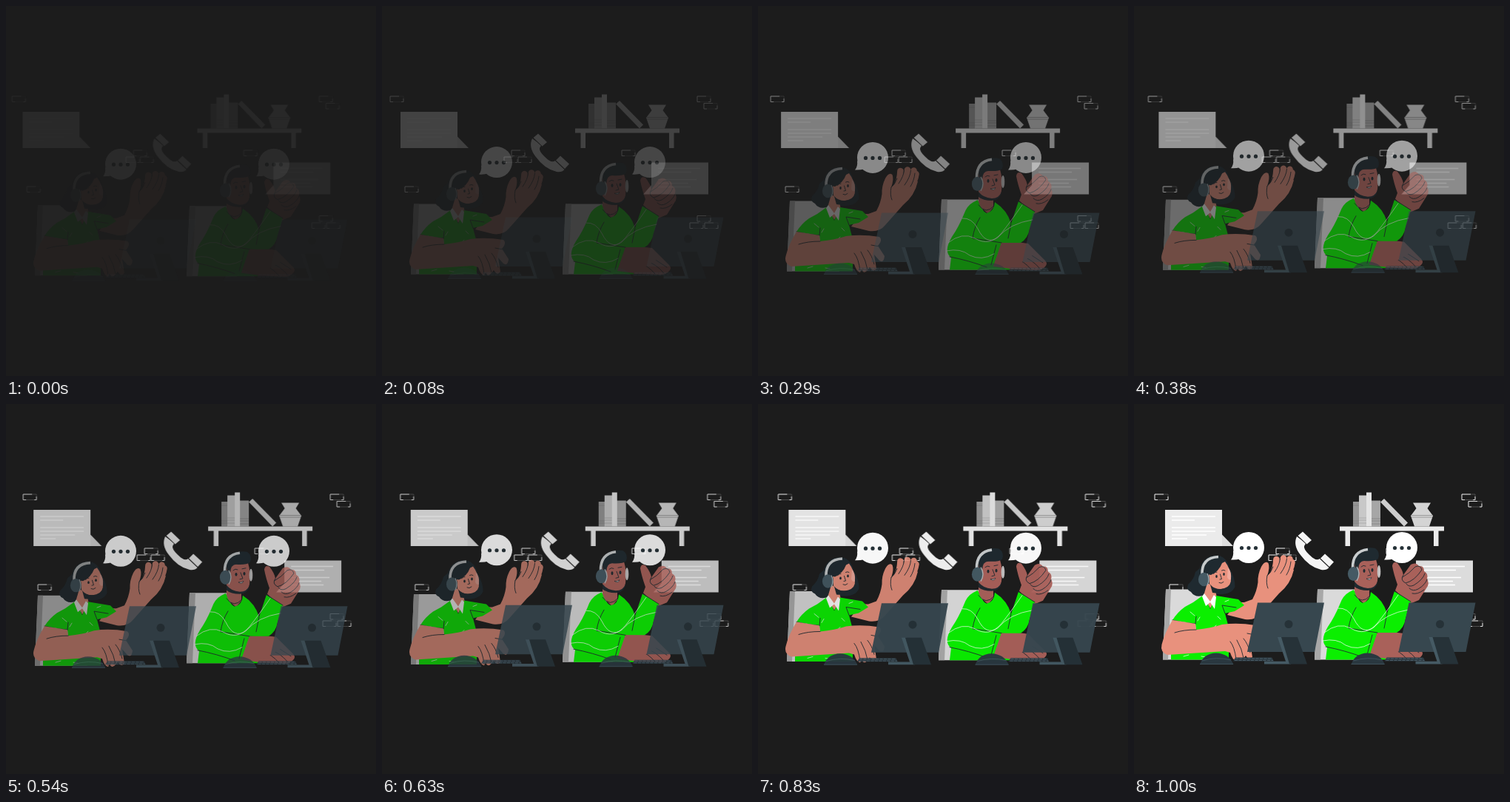
Recreate the animation shown at these times as an HTML page. Size 500 by 500 pixels, loop 1.04 s.

```html
<!DOCTYPE html>
<html lang="en">
<head>
<meta charset="utf-8">
<title>Support desk</title>
<style>
html, body { margin: 0; width: 100%; height: 100%; overflow: hidden; background: #1c1c1c; }
svg { display: block; width: 100vw; height: 100vh; }
.ink { fill: none; stroke: #1f2a30; stroke-width: .9; stroke-linecap: round; stroke-linejoin: round; }
.thin { fill: none; stroke: #fff; stroke-width: .7; stroke-linecap: round; }
.text { fill: none; stroke: #fff; stroke-width: 1.3; }
.finger { fill: none; stroke-linecap: round; stroke-linejoin: round; }
.hair { fill: #1f2a30; }
.green { fill: #0bef00; }
</style>
</head>
<body>
<svg viewBox="0 0 500 500">
  <defs>
    <g id="brick" fill="none" stroke-width=".9">
      <path d="M0 0H18V7.500H0Z" stroke="#555"/>
      <path d="M12 0H0V7.500H4M18 3V7.500H15" stroke="#eee"/>
    </g>
    <g id="bubble">
      <path fill="#fff" d="M134 198Q135 206 131 210.500Q138 211 144 209Z"/>
      <circle cx="155" cy="194" r="21" fill="#fff"/>
      <g fill="#263238">
        <circle cx="145.500" cy="194.500" r="2.600"/>
        <circle cx="155" cy="194.500" r="2.600"/>
        <circle cx="164.500" cy="194.500" r="2.600"/>
      </g>
    </g>
    <g id="desk">
      <path fill="#2c3a42" d="M134 347.500L137 342.500H186L189 347.500Z"/>
      <path fill="none" stroke="#4a5d68" stroke-width="1" stroke-dasharray="4 1.500" d="M137 344H187M136 346.500H188"/>
      <path fill="#37474f" d="M167 268.500H257L244 335H153Z"/>
      <circle cx="209" cy="297.500" r="5.500" fill="#263238"/>
      <path fill="#455a64" d="M194 315H201L212 347.500V351.500H176V347.800H205Z"/>
      <path fill="#263238" d="M199 315H221L234 351.500H210Z"/>
      <path fill="#2a3840" d="M89 351.800Q94 337 111 336.500Q128 337 134.500 351.800Z"/>
      <path fill="none" stroke="#455a64" stroke-width=".8" d="M92 347Q111 341 131 346M89 351.500H134"/>
    </g>
  </defs>

  <g id="props">
    <g id="bricks"></g>

    <path fill="#949494" d="M296 132H305V165.500H296Z"/>
    <path fill="#c8c8c8" d="M304 123.500H314V165.500H304Z"/>
    <path fill="#e4e4e4" d="M314 119.500H321V165.500H314Z"/>
    <path fill="#a6a6a6" d="M321 130.500H333V165.500H321Z"/>
    <path fill="none" stroke="#7c7c7c" stroke-width=".7" d="M296 137H304M296 158H304M296 161H304M321 155H333M321 158H333M321 162H333"/>
    <path fill="none" stroke="#a2a2a2" stroke-width=".7" d="M304 154H314M304 157H314M304 161H314"/>
    <path fill="#cecece" d="M333 132.500L338 128L370 160.500L365 165.500Z"/>
    <path fill="#d4d4d4" d="M377 133.500H401L396.500 141L404 151L399 165.500H379L374 151L381.500 141Z"/>
    <path fill="none" stroke="#929292" stroke-width=".9" d="M374.500 150.500H403.500M375 153H403"/>
    <path fill="#ebebeb" d="M278 165.500H419V171.500H411.500V192H405V171.500H292V192H285.500V171.500H278Z"/>

    <path fill="#ebebeb" d="M42 143H119V192H42Z"/>
    <path fill="#dedede" d="M119 176.500L134 192H119Z"/>
    <path class="text" d="M51 152H110M51 157H82M51 167H110M51 172H110M51 177H98M51 182H72"/>
    <path fill="#dcdcdc" d="M381 211.500H458V254.500H370L381 242Z"/>
    <path class="text" d="M390 219.500H447M390 224.500H435M390 234.500H442M390 239.500H431M390 244.500H434"/>

    <g fill="#f5f5f5">
      <path d="M220 179Q214.500 191 225 204Q237 220.500 253 224Q260 225 263.500 221L251 209Q247 212 241 207.500Q231 199 230 194Q229.500 191 232.500 188.500Z"/>
      <path d="M221.500 178L228 172.500L240 184L233.500 189.500Z"/>
      <path d="M252 208.500L258 202.500L270 213.500L264 220Z"/>
    </g>
    <path fill="none" stroke="#1c1c1c" stroke-width=".9" d="M221.500 178.500L233 189.500M251.500 209L264 221"/>
  </g>

  <g id="bubbles">
    <use href="#bubble"/>
    <use href="#bubble" x="207"/>
  </g>

  <g id="woman">
    <path fill="#dadada" d="M43 250.500H98L110 345.500H39Z"/>
    <path fill="#a8a8a8" d="M43 250.500H50L46 345.500H39Z"/>
    <path class="hair" d="M89 222Q94 205 111 204.500Q125 205 129 222Q137 236 136.500 247Q132 258 113 257L96 258Q83 263 77 254Q70 251 73 244Q81 237 83 227Z"/>

    <g fill="#e8917d">
      <path d="M139 268L149 268L160 264Q166 253 167.500 241Q167 230 172 220Q177 211 181.500 215Q184 221 180 232L190 222L216 224Q212 243 196 256L172 283Q164 293 150 291L126 285Z"/>
      <path d="M99 242L109 247L112 262L103 276L94 259Z"/>
    </g>
    <path class="finger" stroke="#e8917d" stroke-width="8.600" d="M187 233Q192 222 192.500 210M195 230Q201 219 202 208.500M202 230Q209 219 210.500 209.500M206 232Q212 224 213.500 214"/>
    <path class="ink" d="M180 232Q178 242 181 249M190 227Q197 217 197.500 209M198 229Q206 218 206.500 209M206 231Q211 223 212 213M180 232Q185 228 188 220"/>

    <path class="green" d="M94 258L80 268L69 274Q59 281 52 292L83 297L85 318L50 338V345.500H128V302L123 283L136 280L149 272L141 264L111 259L103 277Z"/>
    <path fill="#fff" d="M95 256L92 260L97 273L103 268L109 277L111 261L108 258L103 267Z"/>
    <path class="thin" d="M76 281L82 286M89 288L86 293M113 287L117 291M123 267L128 265M108 302L111 299M67 341L74 339M91 341L97 342"/>
    <path class="ink" d="M83 297L84 287M123 283L119 272L138 275M52 292Q66 296 83 297"/>

    <path fill="#e8917d" d="M52 292L83 297L84 305Q104 303 119 298Q140 295 164 299Q169 303 162 311L171 325Q170 335 164 331L157 323L160 342Q156 348 151 340L148 344Q143 350 140 343L138 347Q133 346 130 336L123 334L45 339Q35 335 37.500 325Q41 310 52 292Z"/>
    <path class="ink" d="M55 309Q67 305 84 305M130 321Q136 328 138 345M139 319Q146 331 148 343M148 317Q154 324 157 336M153 310L164 312"/>

    <path fill="#e8917d" d="M101 228Q112 225 117 216L123 213Q130 222 131 235Q132 246 122 249Q110 253 102 243Z"/>
    <path class="hair" d="M99 230Q103 211 118 209L119 215Q115 226 104 231Z"/>
    <path class="hair" d="M103 244Q110 252 121 249.500Q116 257 106 255Z"/>
    <path fill="#f0aa9c" d="M127 221Q132 226 131 237Q128 239 126 234Z"/>
    <g class="hair"><ellipse cx="111.500" cy="233" rx="1.300" ry="1.900"/><ellipse cx="121.500" cy="230" rx="1.300" ry="1.900"/></g>
    <path class="ink" d="M107.500 229.500Q109 226.500 112 227M118.500 225Q121 223.500 123 225M116.500 230L118.500 236.500L116 237M115 241.500Q118 243.500 121 240.500"/>
    <path fill="none" stroke="#c6cacb" stroke-width="3.600" d="M92 231Q91 207.500 114 206.500"/>
    <ellipse cx="94.500" cy="237" rx="7.600" ry="9.200" fill="#455a64"/>
    <path fill="none" stroke="#a9b0b3" stroke-width="1.200" d="M99 229Q103 237 99 245"/>
  </g>

  <g id="man">
    <path fill="#dadada" d="M248 250.500H302L312 345.500H244Z"/>
    <path fill="#a8a8a8" d="M248 250.500H256L252 345.500H244Z"/>

    <g fill="#a9615a">
      <path d="M353 252L356 244Q351 230 349 219Q350 212 356 215Q363 224 364 231L374 217Q381 213 385 219Q392 218 392 226Q398 229 396 236Q400 243 395 249L385 265L373 270Z"/>
      <path d="M298 240L318 246V261L311 270L298 258Z"/>
      <path d="M328 309Q346 307 365 310Q375 320 386 331Q392 336 389 340Q384 347 374 346L350 345H316Z"/>
    </g>
    <path class="ink" d="M364 231Q359 238 367 242Q379 239 389 224Q387 217 380 220Q372 229 363 234M368 243Q371 248 378 245Q391 237 393 229M372 249Q377 254 384 250Q394 244 396 237M376 256Q383 258 392 251M348 331Q359 333 369 345M356 327Q370 331 381 344M362 321L385 336"/>

    <path class="green" d="M297 251L291 254Q282 259 278 271Q271 288 262 301Q250 321 261 329L259 345.500H340L341 339L318 341L329 309L355 309Q365 303 367 290L374 267L352 253L342 283Q337 265 320 254Q319 267 309 269Q302 266 297 251Z"/>
    <path fill="#a9615a" d="M329 309L361 310L371 326L350 339L341 344L318 341Z"/>
    <path class="ink" d="M300 275Q292 288 290 303L329 309M259 328Q285 333 309 342M342 283L338 303M352 253L374 267M322 312L315 339M298 258Q308 272 319 259"/>
    <path class="thin" d="M276 276Q289 275 297 290Q308 313 324 302Q340 283 371 278M257 309Q276 294 293 303Q313 315 329 296Q341 281 357 258M255 320Q274 316 286 326Q302 334 319 324"/>

    <path fill="#a9615a" d="M298 213L327 210Q331 222 329 239Q328 249 316 250Q304 251 298 242Z"/>
    <path class="hair" d="M299 222Q295 205 306 197Q317 193 326 195Q333 200 330 209Q325 213 311 212Q304 212 303 223Z"/>
    <path class="hair" d="M298 240Q304 248 316 249Q326 249 329 240Q328 251 316 252Q304 252 298 247Z"/>
    <g class="hair"><ellipse cx="311" cy="225.500" rx="1.500" ry="2.400"/><ellipse cx="322" cy="224.500" rx="1.500" ry="2.400"/></g>
    <path class="ink" d="M307 220Q310 217 313 219M319 218L324 217M317 223L320 231L316 232"/>
    <path fill="#fff" stroke="#1f2a30" stroke-width=".7" d="M314 236Q318 237 321 234.500Q319 239.500 314 236Z"/>
    <path fill="none" stroke="#c9cdce" stroke-width="3.600" d="M295.500 222Q295 199 316 196.500"/>
    <ellipse cx="296.500" cy="229.500" rx="7.600" ry="9.600" fill="#455a64"/>
    <path fill="none" stroke="#adb4b7" stroke-width="1.400" d="M301 220Q307 229 301 239"/>
    <ellipse cx="331" cy="226.500" rx="2.300" ry="8.500" fill="#c4c2c2"/>
  </g>

  <g id="desks">
    <use href="#desk"/>
    <use href="#desk" x="204.500"/>
  </g>
</svg>
<script>
const LOOP = 1040, STEPS = 25, SHIFT = 21, RISE = 19.5;
const $ = id => document.getElementById(id);

const spots = [[28, 122], [48, 244], [192, 195], [201, 204], [182, 204], [341, 195],
  [443, 122], [452, 131.5], [443, 283.5], [433, 293], [453, 293]];
$("bricks").innerHTML = spots.map(([x, y]) => `<use href="#brick" x="${x}" y="${y}"/>`).join("");

function place(id, dx, dy, alpha) {
  const g = $(id);
  g.setAttribute("transform", `translate(${dx.toFixed(2)} ${dy.toFixed(2)})`);
  g.setAttribute("opacity", alpha.toFixed(3));
}

// The picture advances in 25 steps whose starts are rounded to 10 ms.
function stepAt(ms) {
  const tick = Math.floor(ms / 10);
  return Math.ceil((tick + 0.5) * 10 * STEPS / LOOP) - 1;
}

function draw() {
  const step = stepAt(performance.now() % LOOP) + 1;
  const u = step / STEPS;
  const rise = Math.min(1, step / (STEPS - 1));
  const ease = Math.sin(u * Math.PI / 2);
  const off = SHIFT * (1 - ease);
  place("props", -off, 0, ease);
  place("bubbles", 0, off, ease);
  place("woman", 0, RISE * (1 - rise), rise);
  place("man", 0, off, ease);
  place("desks", 0, off, ease);
  requestAnimationFrame(draw);
}
draw();
</script>
</body>
</html>
```
